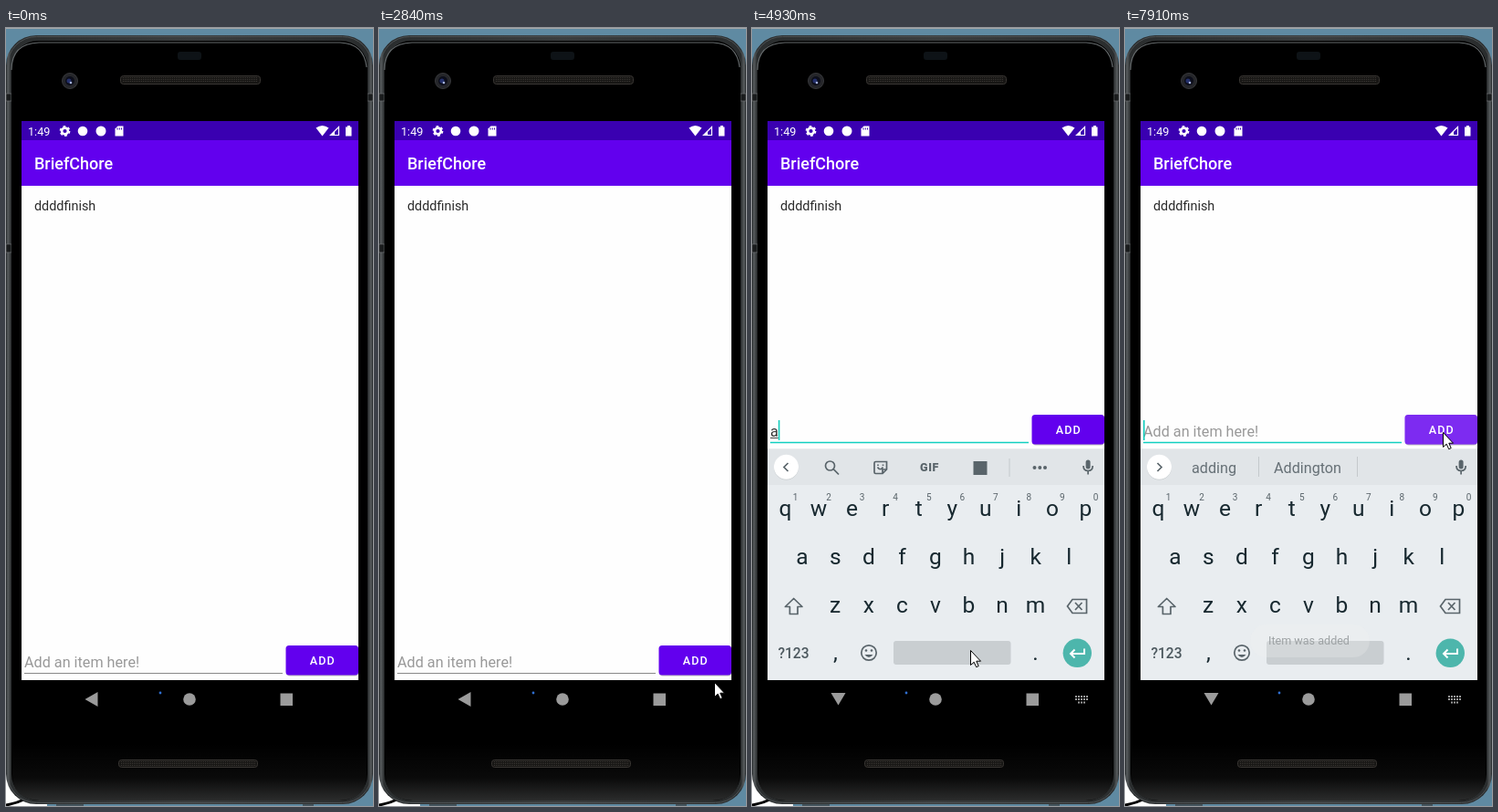
Write an HTML page that moves like this. It is 402 by 853 pixels and loops after 8000 ms.

```html
<!DOCTYPE html>
<html lang="en">
<head>
<meta charset="utf-8">
<title>To-do list</title>
<style>
  html, body { margin: 0; width: 100%; height: 100%; overflow: hidden; background: #5f8aa2; }
  svg { display: block; width: 402px; height: 853px; font-family: Roboto, sans-serif; }
  .mid { text-anchor: middle; }
  .icon { fill: none; stroke: #59646a; stroke-width: 1.7; }
  .solid { fill: #59646a; }
</style>
</head>
<body>
<svg viewBox="0 0 402 853">
  <defs>
    <linearGradient id="edge">
      <stop offset="0" stop-color="#25292b"/>
      <stop offset=".006" stop-color="#55595b"/>
      <stop offset=".014" stop-color="#2a2d2e"/>
      <stop offset=".5" stop-color="#3a3d3e"/>
      <stop offset=".986" stop-color="#2a2d2e"/>
      <stop offset=".994" stop-color="#55595b"/>
      <stop offset="1" stop-color="#25292b"/>
    </linearGradient>
    <linearGradient id="chin" x2="0" y2="1">
      <stop offset="0" stop-color="#000"/>
      <stop offset=".6" stop-color="#0a0a0a"/>
      <stop offset="1" stop-color="#2b2c2c"/>
    </linearGradient>
    <pattern id="mesh" width="2" height="2" patternUnits="userSpaceOnUse">
      <path d="M0 0H1V1H0Z" fill="#3b3835"/>
    </pattern>
    <clipPath id="screenClip"><path d="M17 102H386V715H17Z"/></clipPath>
  </defs>

  <!-- Phone body -->
  <path d="M0 0H402V853H0Z" fill="#5f8aa2"/>
  <path d="M0 .5H402" stroke="#a3a7a8"/>
  <path d="M0 815H45V853H0Z" fill="#fff"/>
  <path d="M0 852Q12 850 24 844" fill="none" stroke="#000" stroke-width="3"/>
  <path d="M308 8h12v3h-12zM55 849h30v4H55zM325 849h12v4h-12z" fill="#45555e"/>
  <rect y="8" width="402" height="843" rx="33" fill="url(#edge)"/>
  <rect x="1.5" y="9.5" width="399" height="840" rx="32" fill="none" stroke="#4c5052"/>
  <path d="M0 72h6v8H0zM396 72h6v8h-6zM0 237h6v9H0z" fill="#1a1c1d" stroke="#6a6e70" stroke-width=".7"/>
  <rect x="6" y="14" width="390" height="833" rx="29"/>
  <path d="M7 785H395V818Q395 846 365 847H37Q7 846 7 818Z" fill="url(#chin)"/>
  <path d="M6 46Q6 17 36 16H366Q392 17 395 43" fill="none" stroke="#64696b" stroke-width="1.2"/>
  <rect x="188" y="26" width="26" height="9" rx="3" fill="#0e1317"/>
  <circle cx="70" cy="58" r="8.5" fill="#25262a" stroke="#37383b"/>
  <circle cx="70" cy="58" r="5" fill="#0c0e1a"/>
  <circle cx="69" cy="58" r="2.5" fill="#24306b"/>
  <circle cx="71" cy="60" r="1.3" fill="#a6b4dd"/>
  <g fill="#171614" stroke="#393633">
    <rect x="125.5" y="52.5" width="153" height="9" rx="3"/>
    <rect x="123.5" y="802.5" width="152" height="8" rx="3"/>
  </g>
  <path d="M128 54H276V60H128ZM126 804H273V809H126Z" fill="url(#mesh)"/>

  <!-- App -->
  <g clip-path="url(#screenClip)">
    <path d="M17 102H386V715H17Z" fill="#fefefe"/>
    <path d="M17 102H386V123H17Z" fill="#3a00b1"/>
    <path d="M17 123H386V173H17Z" fill="#6200ee"/>
    <g fill="#fff">
      <text x="24" y="117.5" font-size="12.6">1:49</text>
      <circle cx="64.5" cy="113" r="3.4" fill="none" stroke="#fff" stroke-width="2.6"/>
      <circle cx="64.5" cy="113" r="5.1" fill="none" stroke="#fff" stroke-width="1.6" stroke-dasharray="2.8 2.54"/>
      <circle cx="84" cy="113" r="5.3"/>
      <circle cx="104" cy="113" r="5.5"/>
      <path d="M122.5 107.5H128.5V118.5H119.5V110.5Z"/>
      <path d="M122 109.5v2M124.3 109.5v2M126.5 109.5v2" stroke="#3a00b1"/>
      <path d="M346.5 118.5L339.5 109.5Q346.5 104.5 353.5 109.5Z"/>
      <path d="M355.5 117.5L364.5 108.5V117.5Z" fill="none" stroke="#fff" stroke-width="1.2"/>
      <path d="M360 113V117.5H355.5Z"/>
      <path d="M372 108.5H374V107H377V108.5H378.5V118.5H372Z"/>
      <text x="31" y="155" font-size="18" font-weight="500">BriefChore</text>
    </g>
    <text x="31" y="200" font-size="14.4" fill="#2b2b2b">ddddfinish</text>

    <g id="entry">
      <text id="hint" x="20" y="700.5" font-size="16.2" fill="#999">Add an item here!</text>
      <text id="typed" x="20" y="700.5" font-size="16.2" fill="#333"></text>
      <path id="composing" stroke="#444"/>
      <path id="underline" d="M20 707.5H303"/>
      <path id="caret" stroke="#15cdbd" stroke-width="1.6"/>
      <rect x="307" y="678.5" width="79" height="32" rx="4" fill="#000" opacity=".25"/>
      <rect x="306.5" y="677" width="79.5" height="32.5" rx="3.5" fill="#6200ee"/>
      <rect id="ripple" x="306.5" y="677" width="79.5" height="32.5" rx="3.5" fill="#fff"/>
      <text x="346.8" y="697.8" class="mid" font-size="12.57" font-weight="500" letter-spacing="1.1" fill="#fff">ADD</text>
    </g>

    <g id="keyboard">
      <path d="M17 461.5H386V715H17Z" fill="#e9edf0"/>
      <path d="M17 461.5H386V501H17Z" fill="#e1e5e8"/>
      <circle cx="37.5" cy="482" r="13.5" fill="#c8cdd0"/>
      <circle cx="37.5" cy="481.3" r="13.5" fill="#fff"/>
      <path id="chevron" class="icon" stroke-width="2"/>
      <g id="tools">
        <circle cx="85.5" cy="480" r="5" class="icon"/>
        <path d="M89.2 483.7L95 489.5" class="icon" stroke-width="2"/>
        <path d="M135.5 475.5H147.5V484L143 488.5H135.5Q134 488.5 134 487V477Q134 475.5 135.5 475.5ZM147.5 484H143V488.5M137.5 481.5Q140.5 486 143.5 481.5M138 478.5v1.5M143.5 478.5v1.5" class="icon" stroke-width="1.5"/>
        <text x="194.5" y="486" class="mid solid" font-size="12.5" font-weight="900" letter-spacing=".6">GIF</text>
        <path d="M242.5 475H257.5V490H242.5Z" class="solid"/>
        <path d="M282 472V492" stroke="#c4c9cc"/>
        <g class="solid"><circle cx="309.5" cy="482" r="2"/><circle cx="315.3" cy="482" r="2"/><circle cx="321" cy="482" r="2"/></g>
      </g>
      <g id="suggestions" font-size="16.2" fill="#667076" class="mid">
        <path d="M146.5 470V492M254.5 470V492" stroke="#c4c9cc"/>
        <text x="97.5" y="487.5"></text><text x="200" y="487.5"></text><text x="302" y="487.5"></text>
      </g>
      <rect x="365.6" y="473.5" width="5" height="10" rx="2.5" class="solid"/>
      <path d="M363 480Q363 485.5 368.1 485.5T373.2 480M368.1 485.5V489.5" class="icon"/>

      <g id="keys">
        <g id="letters" class="mid" font-size="24.5" fill="#17282f"></g>
        <path d="M45.7 625.5L55 634.5H50V642.5H41.4V634.5H36.4Z" class="icon" stroke-linejoin="round"/>
        <path d="M351 626.5H366.5V641.5H351L345.5 634ZM354 630L361.5 638M361.5 630L354 638" class="icon"/>
        <text x="45.5" y="690.5" class="mid" font-size="15.6" font-weight="500" fill="#4d595f">?123</text>
        <circle cx="128" cy="685" r="8.2" class="icon"/>
        <path d="M123.5 687Q128 693 132.5 687Z" class="solid"/>
        <circle cx="125" cy="682.5" r="1.3" class="solid"/><circle cx="131" cy="682.5" r="1.3" class="solid"/>
        <rect x="155" y="672" width="128.5" height="26" rx="3" fill="#c9ced1"/>
        <circle cx="356.3" cy="685.3" r="15.7" fill="#4db6ac"/>
        <path d="M364 680.5V686H349M353.5 681.5L349 686L353.5 690.5" fill="none" stroke="#fff" stroke-width="2"/>
      </g>
    </g>
    <g id="toast">
      <rect x="137" y="654" width="131" height="36" rx="18" fill="#f0f0f0" opacity=".25"/>
      <text x="201.5" y="676" class="mid" font-size="12.57" fill="#9da2a4">Item was added</text>
    </g>
  </g>

  <!-- Navigation bar -->
  <g fill="#9b9b9b">
    <path id="back"/>
    <circle cx="201" cy="736" r="6.8"/>
    <path d="M300.5 729.5H314V743H300.5Z"/>
    <path id="switcher" d="M354 733H368M354 736H368M357 739.5H365" stroke="#9b9b9b" stroke-width="2" stroke-dasharray="2 1"/>
  </g>
  <circle cx="169" cy="729" r="1.4" fill="#2f6fd0"/>

  <path id="pointer" d="M.5 .5V16.5L4.2 13.2L6.7 18.7L9.2 17.6L6.8 12.2H11.5Z" fill="#fff" stroke="#000"/>
</svg>

<script>
const LOOP = 8000;
const $ = id => document.getElementById(id);
const set = (id, attrs) => { for (const k in attrs) $(id).setAttribute(k, attrs[k]); };
const show = (id, on) => set(id, { visibility: on ? 'visible' : 'hidden' });

// Each track holds [start time, ...value]; the latest started entry applies.
const at = (track, t) => track.findLast(step => step[0] <= t).slice(1);

const pointerTrack = [
  [0, -50, -50], [1050, 333, 614], [1200, 343, 682], [1320, 352, 736], [1440, 345, 712],
  [1560, 325, 640], [1680, 292, 540], [1810, 248, 417], [1930, 168, 244], [2080, 154, 213],
  [2200, 165, 240], [2320, 210, 340], [2450, 265, 480], [2570, 308, 603], [2720, 345, 680],
  [2840, 367, 717], [2960, 309, 701], [3110, 278, 694], [3260, 271, 688], [3820, 250, 683],
  [3940, 243, 682], [4100, 239, 682], [6860, 245, 672], [6980, 262, 640], [7100, 284, 597],
  [7250, 330, 500], [7370, 348, 444], [7520, 348, 443]
];
const textTrack = [[0, ''], [4930, 'a'], [5070, 'ad'], [5350, 'add'], [6150, 'addin'], [6320, 'adding'], [7790, '']];
const caretTrack = [[0, 0], [3820, 1], [4100, 0], [4540, 1], [5750, 0], [6150, 1], [6860, 0], [7370, 1]];
const suggestionTrack = [
  [0, '', '', ''], [5200, 'ad', 'and', 'ads'], [5350, 'add', 'and', 'ads'],
  [6150, 'addin', 'adding', 'add-in'], [6320, 'adding', 'Addington', '']
];
const rippleTrack = [[0, 0], [7670, .08], [7790, .17]];

function addKey(char, x, y, size, fill) {
  const key = document.createElementNS('http://www.w3.org/2000/svg', 'text');
  key.textContent = char;
  key.setAttribute('x', x);
  key.setAttribute('y', y);
  if (size) key.setAttribute('font-size', size);
  if (fill) key.setAttribute('fill', fill);
  $('letters').append(key);
}
const PITCH = 36.55;
[['qwertyuiop', 36.5, 535], ['asdfghjkl', 54.8, 588], ['zxcvbnm', 91.2, 641]].forEach(([row, x, y]) =>
  [...row].forEach((char, i) => addKey(char, x + i * PITCH, y)));
[...'1234567890'].forEach((digit, i) => addKey(digit, 47.5 + i * PITCH, 517.5, 10, '#59646a'));
addKey(',', 91.5, 693);
addKey('.', 310.5, 693);

function draw(t) {
  const focused = t >= 3820, keyboardUp = t >= 4100, suggesting = t >= 5200;
  const [text] = at(textTrack, t);

  set('pointer', { transform: `translate(${at(pointerTrack, t)})` });
  set('entry', { transform: `translate(0 ${keyboardUp ? -253 : 0})` });
  set('underline', focused
    ? { stroke: '#10cfc0', 'stroke-width': 1.7 }
    : { stroke: '#888', 'stroke-width': 1 });

  show('hint', !text);
  $('typed').textContent = text;
  const end = 20 + (text ? $('typed').getComputedTextLength() : 0);
  set('composing', { d: text ? `M20 702.5H${end}` : '' });
  set('caret', { d: `M${end + .8} 683V705` });
  show('caret', at(caretTrack, t)[0]);
  set('ripple', { opacity: at(rippleTrack, t)[0] });

  show('keyboard', keyboardUp);
  set('keys', { transform: `translate(0 ${t < 4280 ? 1 : 0})` });
  set('chevron', { d: suggesting ? 'M35.5 477L40 481.5L35.5 486' : 'M39.5 477L35 481.5L39.5 486' });
  set('tools', { display: suggesting ? 'none' : 'inline' });
  set('suggestions', { display: suggesting ? 'inline' : 'none' });
  const words = at(suggestionTrack, t);
  const labels = $('suggestions').querySelectorAll('text');
  labels.forEach((label, i) => label.textContent = words[i]);
  const corrected = words[1] === 'adding';
  labels[1].setAttribute('font-weight', corrected ? 700 : 400);
  labels[1].setAttribute('fill', corrected ? '#101618' : '#667076');

  show('toast', t >= 7910);
  set('back', { d: keyboardUp ? 'M86.5 729H102.5L94.5 742.5Z' : 'M100.5 728V744L86.5 736Z' });
  show('switcher', focused);
}

function frame() {
  draw(performance.now() % LOOP);
  requestAnimationFrame(frame);
}
frame();
</script>
</body>
</html>
```
